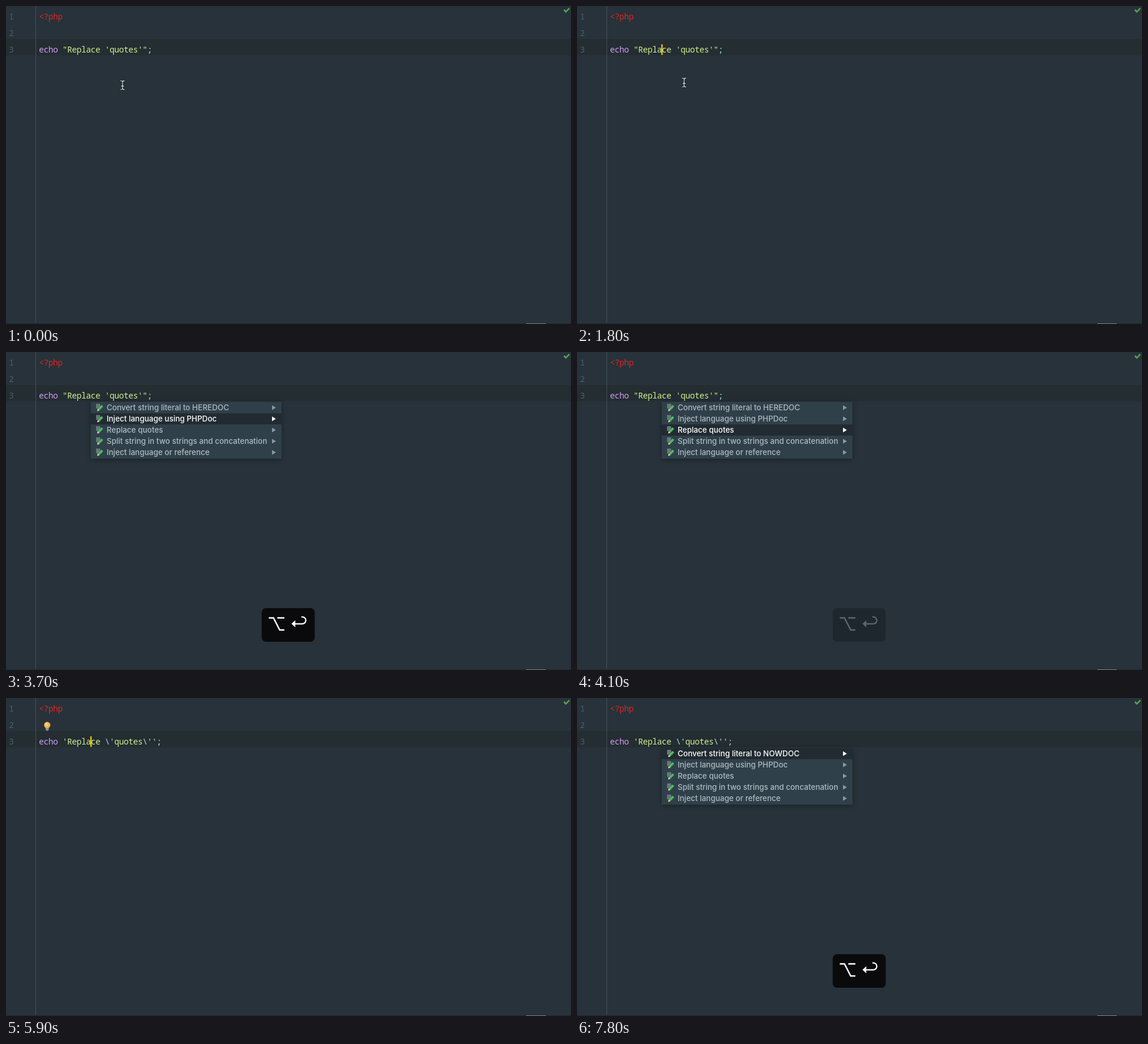
An HTML page for the animation above (8000 ms loop, 960 px wide and 540 px high).

```html
<!DOCTYPE html>
<html lang="en">
<head>
<meta charset="utf-8">
<title>Swapping quote style</title>
<style>
  html, body { margin: 0; width: 100%; height: 100%; overflow: hidden; background: #27323a; }
  svg { display: block; width: 960px; height: 540px; }
  text { white-space: pre; }
  .code { font: 500 14px "Noto Sans Mono", monospace; letter-spacing: -0.4px; }
  .num { fill: #4a5e66; }
  .tag { fill: #e02420; }
  .key { fill: #cf9cf3; }
  .str { fill: #cbf08c; }
  .op { fill: #a9e6e9; }
  .menu { filter: drop-shadow(0 2px 4px rgba(0, 0, 0, .3)); }
  .row { font: 500 13px Inter, sans-serif; fill: #aebac0; }
  .row .bar { fill: none; }
  .row .tip { fill: #8d999f; }
  .row.on, .row.on .tip { fill: #fff; }
  .row.on .bar { fill: #222b31; }
</style>
</head>
<body>
<svg viewBox="0 0 960 540">
  <defs>
    <g id="pencil">
      <path d="M0 0h7v4l-4 4h-3z" fill="#69767c"/>
      <path d="M2.8 8.2l6.4-6.4 3 3-6.4 6.4z" fill="#3fae53"/>
      <path d="M4.2 9.5l6.4-6.4" stroke="#7ed68a" stroke-width="1"/>
      <path d="M2.8 8.2l3 3-4 1.2z" fill="#e5d9a8"/>
    </g>
    <path id="beam" d="M-3-7.5q3 0 3 2.5q0-2.5 3-2.5M0-5V5M-3 7.5q3 0 3-2.5q0 2.5 3 2.5M-2 1.5h4"/>
  </defs>
  <rect width="960" height="540" fill="#27323a"/>
  <rect y="56" width="960" height="28" fill="#242d32"/>
  <path d="M50.5 0v538" stroke="#43515a"/>
  <path d="M0 539.5h960" stroke="#1e282e"/>
  <path d="M884 539.5h33" stroke="#7b858b"/>
  <path id="check" d="M948 6.3l3.2 3.6 6-6" fill="none" stroke="#55a44e" stroke-width="2.6"/>

  <g class="code">
    <g class="num">
      <text x="5" y="23">1</text>
      <text x="5" y="51">2</text>
      <text x="5" y="79">3</text>
    </g>
    <text x="56" y="23" class="tag">&lt;?php</text>
    <text id="double" x="56" y="79"><tspan class="key">echo </tspan><tspan class="str">"Replace 'quotes'"</tspan><tspan class="op">;</tspan></text>
    <text id="single" x="56" y="79"><tspan class="key">echo </tspan><tspan class="str">'Replace </tspan><tspan class="op">\'</tspan><tspan class="str">quotes</tspan><tspan class="op">\'</tspan><tspan class="str">'</tspan><tspan class="op">;</tspan></text>
  </g>

  <g id="bulb">
    <path d="M67.2 50.5h5.6v3l-1.6 2h-2.4l-1.6-2z" fill="#8b9297"/>
    <circle cx="70" cy="46" r="5.4" fill="#f4b450"/>
    <circle cx="69" cy="44.8" r="2.6" fill="#fbd083"/>
  </g>
  <rect id="caret" y="65" width="2.2" height="18" fill="#ffcc00"/>

  <g id="menu" class="menu">
    <rect x="144" y="84.5" width="324" height="96.5" fill="#30404a"/>
  </g>

  <g id="keys">
    <rect x="434.5" y="435" width="90" height="57" rx="7" fill="#0a0a0c"/>
    <path d="M446.5 451.5h8l10.5 20.5h8M461 451.5h12" fill="none" stroke="#fff" stroke-width="2.4"/>
    <path d="M502 449.8h1.5a5.9 5.9 0 0 1 0 11.8h-14" fill="none" stroke="#fff" stroke-width="2.2"/>
    <path d="M485 461.6l6.5-6v12z" fill="#fff"/>
  </g>

  <g id="mouse" fill="none" stroke-linecap="round">
    <use href="#beam" stroke="#11171a" stroke-width="3"/>
    <use href="#beam" stroke="#d5dadc" stroke-width="1.3"/>
  </g>
</svg>
<script>
const LOOP = 8000, STEP = 100;
const $ = id => document.getElementById(id);
const show = (id, on) => $(id).style.visibility = on ? 'visible' : 'hidden';
const within = (t, a, b) => t >= a && t < b;
const clamp = v => Math.max(0, Math.min(1, v));

const labels = [
  'Convert string literal to HEREDOC',
  'Inject language using PHPDoc',
  'Replace quotes',
  'Split string in two strings and concatenation',
  'Inject language or reference'
];

// [time, value] steps; a caret x of 0 means hidden
const caretSteps = [[0, 0], [100, 71.3], [600, 0], [1100, 71.3], [1300, 143.3],
  [1900, 0], [5100, 143.3], [6000, 0], [6600, 143.3], [7100, 0]];
const menuSteps = [[0, -1], [3000, 0], [3700, 1], [3800, 2], [5000, -1], [7800, 0]];
const mousePath = [[0, 198, 134.5], [500, 71, 76], [900, 135, 76], [1100, 146, 76],
  [1500, 146, 76], [1800, 182, 130], [2200, 184, 142]];

const stepAt = (steps, t) => steps.filter(s => s[0] <= t).pop()[1];

function pathAt(path, t) {
  const i = path.findIndex(p => p[0] > t);
  if (i < 0) return path[path.length - 1].slice(1);
  const [a, b] = [path[i - 1], path[i]];
  const k = (t - a[0]) / (b[0] - a[0]);
  const e = k * k * (3 - 2 * k);
  return [a[1] + (b[1] - a[1]) * e, a[2] + (b[2] - a[2]) * e];
}

labels.forEach((label, i) => {
  const y = 85 + 19 * i;
  $('menu').insertAdjacentHTML('beforeend', `<g class="row">
    <rect class="bar" x="144" y="${y}" width="324" height="19"/>
    <use href="#pencil" x="153" y="${y + 3}"/>
    <text x="171" y="${y + 14}">${label}</text>
    <path class="tip" d="M452 ${y + 5.5}l6.5 4-6.5 4z"/></g>`);
});
const rows = [...document.querySelectorAll('.row')];
const convert = rows[0].querySelector('text');

function draw(t) {
  const caret = stepAt(caretSteps, t);
  show('caret', caret > 0);
  $('caret').setAttribute('x', caret);

  const swapped = t >= 5100;
  show('double', !swapped);
  show('single', swapped);
  convert.textContent = swapped ? labels[0].replace('HERE', 'NOW') : labels[0];

  const row = stepAt(menuSteps, t);
  show('menu', row >= 0);
  rows.forEach((r, i) => r.classList.toggle('on', i === row));

  show('check', !within(t, 5100, 5500));
  show('bulb', within(t, 2200, 3000) || within(t, 5900, 7800));

  const first = clamp((t - 2500) / 400) * clamp((4200 - t) / 400);
  $('keys').style.opacity = Math.max(first, clamp((t - 7400) / 300));

  show('mouse', t < 2600);
  $('mouse').setAttribute('transform', `translate(${pathAt(mousePath, t)})`);
}

const start = performance.now();
function tick() {
  const t = (performance.now() - start) % LOOP;
  draw(Math.floor(t / STEP) * STEP);
  requestAnimationFrame(tick);
}
tick();
</script>
</body>
</html>
```
